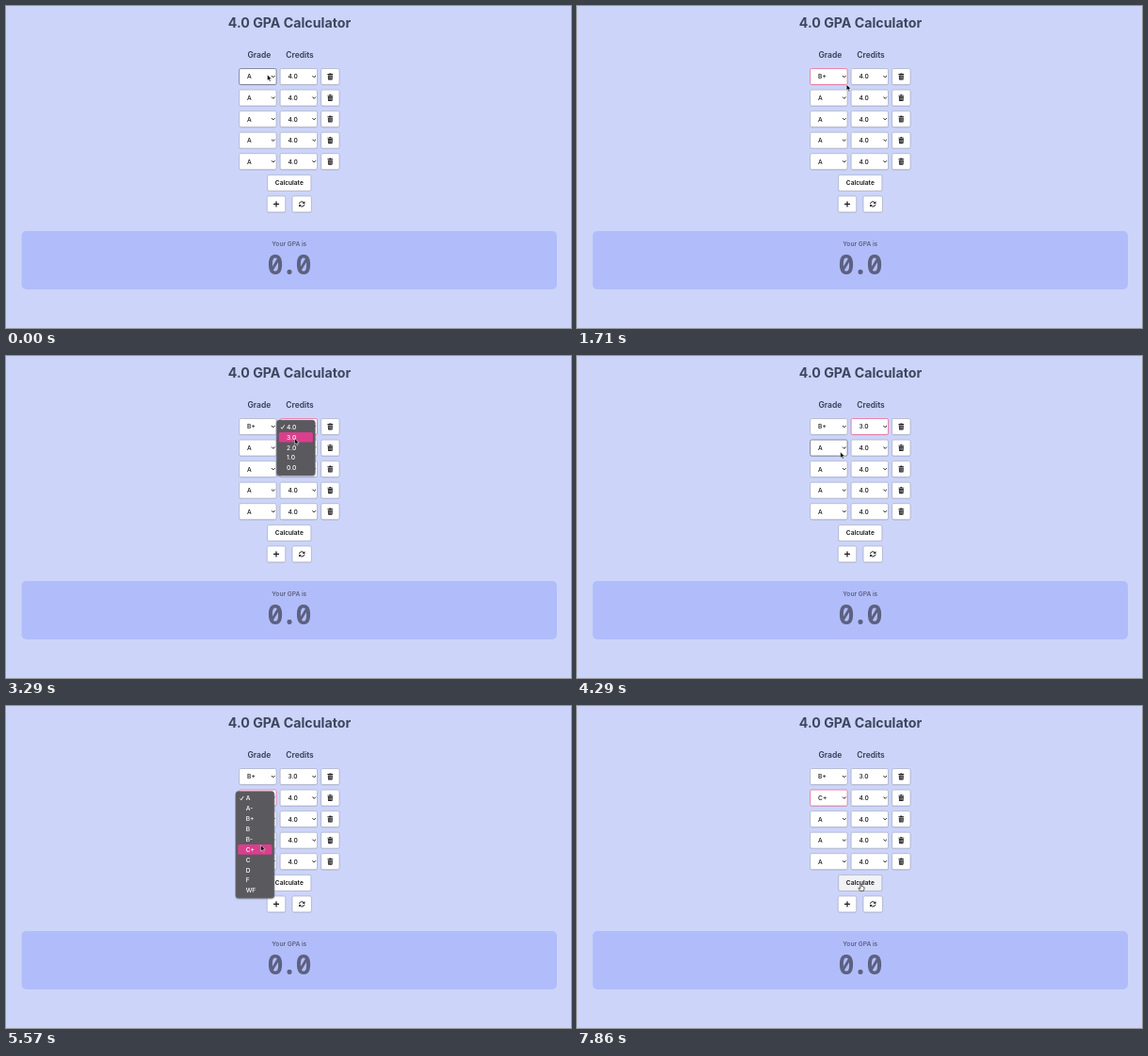
Write an HTML page that moves like this. It is 600 by 342 pixels and loops after 8000 ms.

```html
<!DOCTYPE html>
<html lang="en">
<head>
<meta charset="utf-8">
<title>GPA Calculator</title>
<style>
  html, body { margin: 0; width: 100%; height: 100%; overflow: hidden; background: #ccd5f9; }
  svg { display: block; width: 100vw; height: 100vh; }
  text { font-family: Inter, sans-serif; font-size: 6.62px; font-weight: 500; fill: #151515; }
  .mid { text-anchor: middle; }
  .title { font-size: 14.2px; font-weight: 700; fill: #3e4660; }
  .head { font-size: 8.5px; font-weight: 600; fill: #343c55; }
  .note { font-weight: 600; fill: #5c6281; }
  .gpa { font: 700 28.4px "Noto Sans Mono", monospace; letter-spacing: -2.1px; fill: #5c6180; }
  .menu text { fill: #fff; }
  .line { fill: none; stroke: #1d1d1f; stroke-width: 1; stroke-linecap: round; stroke-linejoin: round; }
</style>
</head>
<body>
<svg id="stage" viewBox="0 0 600 342"></svg>
<script>
const NS = 'http://www.w3.org/2000/svg';
const stage = document.getElementById('stage');
const LOOP = 8000, FPS = 7;
const GRADES = ['A', 'A-', 'B+', 'B', 'B-', 'C+', 'C', 'D', 'F', 'WF'];
const CREDITS = ['4.0', '3.0', '2.0', '1.0', '0.0'];
const PITCH = 10.9;
const BORDER = '#aeb3ca', HOVER = '#6d7488', FOCUS = '#ea6c97';
const rowY = i => 75 + 22.55 * i;

function add(tag, attrs, parent = stage) {
  const el = document.createElementNS(NS, tag);
  for (const k in attrs) el.setAttribute(k, attrs[k]);
  parent.appendChild(el);
  return el;
}

function label(text, x, y, cls = '', parent = stage) {
  const el = add('text', { x, y, class: cls }, parent);
  el.textContent = text;
  return el;
}

// White control with a thin border and a faint shadow, centred on cy
function box(x, cy, w, h = 17) {
  const y = cy - h / 2;
  add('rect', { x: x - 0.2, y: y + 0.7, width: w + 0.4, height: h, rx: 1.8, fill: '#7f88ad', opacity: 0.4 });
  return add('rect', { x, y, width: w, height: h, rx: 1.6, fill: '#fff', stroke: BORDER, 'stroke-width': 0.8 });
}

function select(x, cy, value) {
  const rect = box(x, cy, 39.4);
  const text = label(value, x + 8.4, cy + 2.4);
  add('path', { d: `M${x + 34.6} ${cy - 0.7}l1.5 1.5 1.5-1.5`, class: 'line' });
  return { x, cy, rect, text };
}

function trash(cy) {
  box(334.6, cy, 19.4);
  const g = add('g', { transform: `translate(344.3 ${cy})`, fill: '#1d1d1f' });
  add('path', { d: 'M-2.9-2.9H-1.2L-.8-3.6H.8L1.2-2.9H2.9V-2.1H-2.9ZM-2.5-1.6H2.5L2.3 2.9Q2.2 3.5 1.6 3.5H-1.6Q-2.2 3.5-2.3 2.9Z' }, g);
  add('path', { d: 'M-1.2-.8V2.6M0-.8V2.6M1.2-.8V2.6', stroke: '#fff', 'stroke-width': 0.4 }, g);
}

function makeMenu(sel, items) {
  const g = add('g', { class: 'menu' });
  const x = sel.x - 3.8, top = sel.cy - 7, first = sel.cy + 0.4;
  const h = items.length * PITCH + 4.6;
  add('rect', { x: x - 0.6, y: top + 0.6, width: 42.2, height: h + 0.8, rx: 3.6, fill: '#3d4466', opacity: 0.25 }, g);
  add('rect', { x, y: top, width: 41, height: h, rx: 3, fill: '#59595e', stroke: '#777a88', 'stroke-width': 0.5 }, g);
  const bar = add('rect', { x: x + 2.4, width: 36.2, height: 10.7, rx: 1.6, fill: '#d93f8d' }, g);
  add('path', { d: `M${x + 4.6} ${first + 0.3}l1.3 1.6 2.4-3.9`, fill: 'none', stroke: '#fff', 'stroke-width': 0.9 }, g);
  items.forEach((s, i) => label(s, x + 10.8, first + i * PITCH + 2.3, '', g));
  return {
    show(open, y) {
      g.setAttribute('display', open ? 'inline' : 'none');
      const i = Math.max(0, Math.min(items.length - 1, Math.round((y - first) / PITCH)));
      bar.setAttribute('y', first + i * PITCH - 5.4);
    }
  };
}

// Page
add('rect', { width: 600, height: 342, fill: '#ccd5f9' });
label('4.0 GPA Calculator', 301, 23, 'mid title');
label('Grade', 268.9, 54.8, 'mid head');
label('Credits', 312, 54.8, 'mid head');

const grades = [], credits = [];
for (let i = 0; i < 5; i++) {
  grades.push(select(247.7, rowY(i), 'A'));
  credits.push(select(291.1, rowY(i), '4.0'));
  trash(rowY(i));
}

const calc = box(277.7, 187.9, 46.2);
label('Calculate', 300.8, 190.3, 'mid').style.fontWeight = 600;

box(277.2, 210.4, 19.6);
add('path', { d: 'M284.5 210.4h5M287 207.9v5', class: 'line', style: 'stroke-width:1.25' });

box(304, 210.4, 20.4);
const sync = add('g', { transform: 'translate(314.2 210.4)' });
for (const turn of [0, 180]) {
  const arm = add('g', { transform: `rotate(${turn})` }, sync);
  add('path', { d: 'M-2.7-.7A2.75 2.75 0 0 1 2.1-1.6', class: 'line' }, arm);
  add('path', { d: 'M3.2-3.2V-.5H.5Z', fill: '#1d1d1f' }, arm);
}

add('rect', { x: 16.6, y: 239, width: 568.4, height: 62, rx: 5, fill: '#b1bdfa' });
label('Your GPA is', 300.8, 255.1, 'mid note');
label('0.0', 300, 285, 'mid gpa');

// Each menu: open between two steps, then the picked value stays
const picks = [
  { sel: grades[0], items: GRADES, open: 3, close: 10, value: 'B+' },
  { sel: credits[0], items: CREDITS, open: 17, close: 25, value: '3.0' },
  { sel: grades[1], items: GRADES, open: 32, close: 41, value: 'C+' }
];
for (const p of picks) p.menu = makeMenu(p.sel, p.items);

const arrow = add('path', {
  d: 'M0 0V6.3L1.5 5 2.5 7.3 3.6 6.8 2.6 4.6H4.6Z',
  fill: '#000', stroke: '#fff', 'stroke-width': 0.5, 'stroke-linejoin': 'round'
});
const hand = add('path', {
  d: 'M-.6.6Q0-.3.6.6V2.6Q1.3 2.1 1.7 2.8 2.4 2.4 2.7 3.1 3.5 2.9 3.5 3.8V5.4L2.8 7.4H-.9L-2.6 4.7Q-2.5 3.7-1.6 4.2L-.6 5Z',
  fill: '#fff', stroke: '#111', 'stroke-width': 0.65, 'stroke-linejoin': 'round'
});

// Pointer path: step, x, y
const path = [
  [0, 277.5, 73], [3, 277.5, 74], [8, 284, 96], [10, 285, 96], [12, 286.2, 83.4],
  [15, 306, 76], [18, 306, 76], [22, 306.5, 87.5], [26, 306.5, 87.5], [30, 279.7, 102],
  [33, 279.5, 101], [39, 270.6, 147.8], [41, 270.5, 151], [50, 270.5, 151.3], [55, 301.5, 189]
];

function pointer(step) {
  let i = 0;
  while (i < path.length - 2 && step >= path[i + 1][0]) i++;
  const [a, ax, ay] = path[i], [b, bx, by] = path[i + 1];
  const u = Math.min(1, (step - a) / (b - a)), e = u * u * (3 - 2 * u);
  return [ax + (bx - ax) * e, ay + (by - ay) * e];
}

const inside = (x, y, r) => {
  const [l, t, w, h] = ['x', 'y', 'width', 'height'].map(k => +r.getAttribute(k));
  return x >= l && x <= l + w && y >= t && y <= t + h;
};

function draw(ms) {
  const step = Math.floor((ms % LOOP + 5) * FPS / 1000);
  const [x, y] = pointer(Math.min(step, 55));
  const opened = picks.filter(p => step >= p.open);
  const focus = opened.length ? opened[opened.length - 1].sel : null;
  const busy = picks.some(p => step >= p.open && step < p.close);

  for (const s of [...grades, ...credits]) {
    const hot = !busy && inside(x, y, s.rect);
    s.rect.setAttribute('stroke', s === focus ? FOCUS : hot ? HOVER : BORDER);
  }
  for (const p of picks) {
    p.sel.text.textContent = step >= p.close ? p.value : p.items[0];
    p.menu.show(step >= p.open && step < p.close, y);
  }

  const onCalc = inside(x, y, calc);
  calc.setAttribute('fill', onCalc ? '#f1f2f5' : '#fff');
  arrow.setAttribute('display', onCalc ? 'none' : 'inline');
  hand.setAttribute('display', onCalc ? 'inline' : 'none');
  (onCalc ? hand : arrow).setAttribute('transform', `translate(${x} ${y})`);
}

const start = performance.now();
function tick() {
  draw(performance.now() - start);
  requestAnimationFrame(tick);
}
draw(0);
requestAnimationFrame(tick);
</script>
</body>
</html>
```
